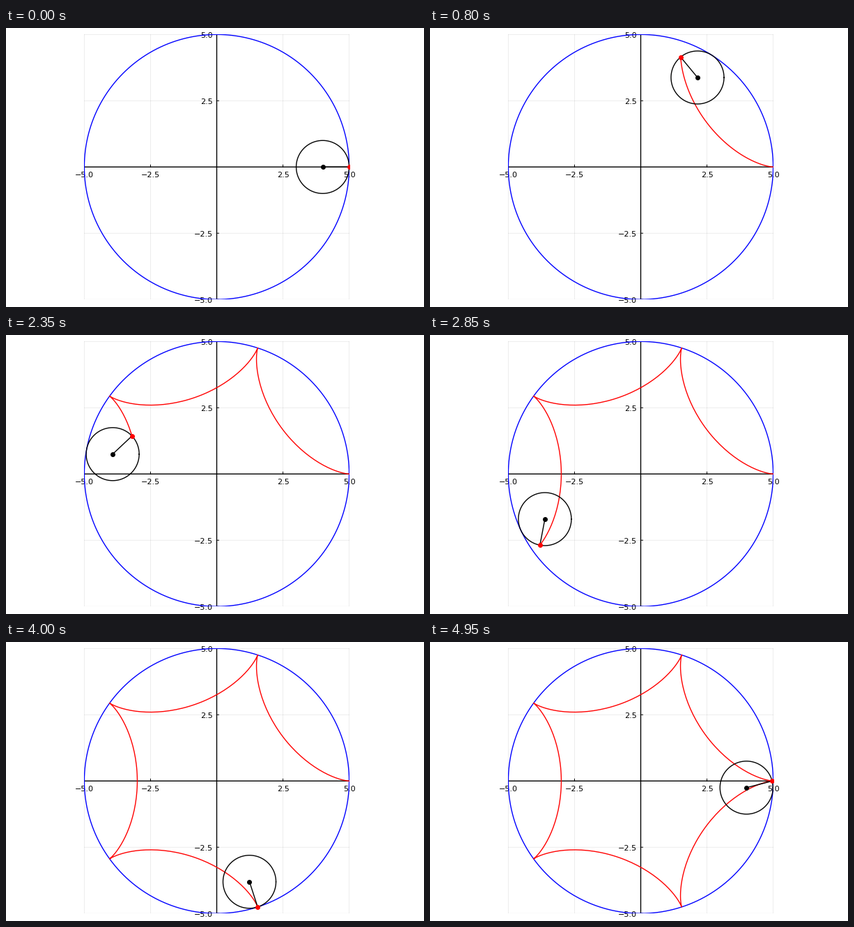
A matplotlib script that plays this animation: 600 px wide and 400 px high, repeating every 5 s.

```python
import numpy as np
import matplotlib.pyplot as plt
from matplotlib.animation import FuncAnimation

W, H, DPI = 600, 400, 100
FRAMES, INTERVAL = 100, 50
BIG, SMALL = 5, 1
PX = 72 / DPI  # points per pixel

plt.rcParams["font.family"] = "DejaVu Sans"

fig = plt.figure(figsize=(W / DPI, H / DPI), dpi=DPI, facecolor="white")
left, right, top, bottom = 112.4, 492.6, 9.3, 389.2
ax = fig.add_axes([left / W, 1 - bottom / H, (right - left) / W, (bottom - top) / H])
ax.set_xlim(-BIG, BIG)
ax.set_ylim(-BIG, BIG)
ax.axis("off")


def line(x, y, color, z, lw=1, **kw):
    return ax.plot(x, y, color=color, lw=lw, zorder=z, snap=False, **kw)[0]


def label(text, xy, dx, dy, ha):
    ax.annotate(text, xy, xytext=(dx * PX, dy * PX), textcoords="offset points",
                ha=ha, va="baseline", fontsize=8, color="black",
                annotation_clip=False, zorder=1.5)


def circle(radius, cx=0, cy=0):
    a = np.linspace(0, 2 * np.pi, 201)
    return cx + radius * np.cos(a), cy + radius * np.sin(a)


def hypocycloid(t):
    d = BIG - SMALL
    k = d / SMALL
    return (d * np.cos(t) + SMALL * np.cos(k * t),
            d * np.sin(t) - SMALL * np.sin(k * t))


# grid, ticks and labels
tick = 3 / 38
for v in (-5, -2.5, 2.5, 5):
    line([v, v], [-BIG, BIG], "black", 0.5, lw=0.5, alpha=0.1)
    line([-BIG, BIG], [v, v], "black", 0.5, lw=0.5, alpha=0.1)
    line([v, v], [0, tick], "black", 1, lw=0.7)
    line([0, tick], [v, v], "black", 1, lw=0.7)
    text = f"{v:.1f}".replace("-", "\u2212")
    label(text, (v, 0), 0, -14.9, "center")
    label(text, (0, v), -5.3, -4.7, "right")
line([-BIG, BIG], [0, 0], "black", 1)
line([0, 0], [-BIG, BIG], "black", 1)

# fixed circle and moving parts
line(*circle(BIG), "blue", 2)
trace = line([], [], "red", 3)
wheel = line([], [], "black", 4)
arm = line([], [], "black", 5)
dot = dict(marker="o", ms=7 * PX, mew=0, ls="none")
hub = line([], [], "black", 6, **dot)
pen = line([], [], "red", 7, **dot)


def draw(i):
    t = 2 * np.pi * i / FRAMES
    cx, cy = (BIG - SMALL) * np.cos(t), (BIG - SMALL) * np.sin(t)
    px, py = hypocycloid(t)
    trace.set_data(*hypocycloid(np.linspace(0, t, 4 * i + 1)))
    wheel.set_data(*circle(SMALL, cx, cy))
    arm.set_data([cx, px], [cy, py])
    hub.set_data([cx], [cy])
    pen.set_data([px], [py])
    return trace, wheel, arm, hub, pen


anim = FuncAnimation(fig, draw, frames=FRAMES, interval=INTERVAL,
                     init_func=lambda: draw(0), repeat=True, repeat_delay=0)
plt.show()
```
